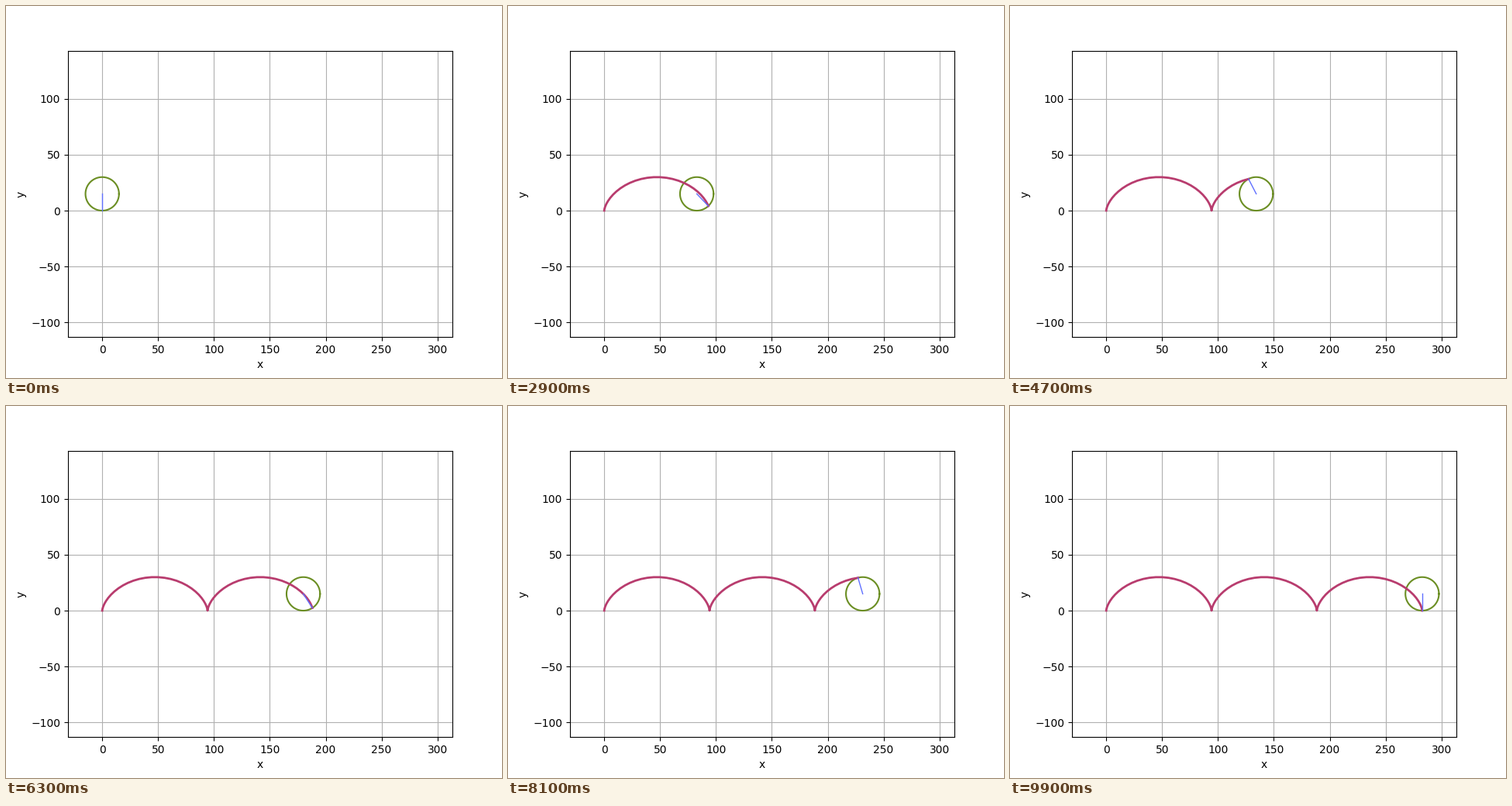
Write a matplotlib script that moves like this. It is 640 by 480 pixels and loops after 10000 ms.

```python
import numpy as np
import matplotlib.pyplot as plt
from matplotlib.animation import FuncAnimation

R = 15
FRAMES = 100
INTERVAL = 100

# Rolling angle over three full turns, and the cycloid of the rim point
theta = np.linspace(0, 6 * np.pi, FRAMES)
path_x = R * (theta - np.sin(theta))
path_y = R * (1 - np.cos(theta))

turn = np.linspace(0, 2 * np.pi, 100)
rim_x, rim_y = R * np.cos(turn), R + R * np.sin(turn)

fig, ax = plt.subplots(figsize=(6.4, 4.8), dpi=100)

# Equal scale on both axes, with a 5% margin around the whole run
left, right = -R, R * theta[-1] + R
margin = 0.05 * (right - left)
half_height = (right - left + 2 * margin) * 369.6 / 496 / 2
ax.set_xlim(left - margin, right + margin)
ax.set_ylim(R - half_height, R + half_height)
ax.set_xlabel("x")
ax.set_ylabel("y")
ax.grid(True)

circle, = ax.plot([], [], color="olivedrab", lw=1.5)
trace, = ax.plot([], [], color="#b83c6e", lw=2)
spoke, = ax.plot([], [], color="#6070ff", lw=1)


def update(i):
    center = R * theta[i]
    circle.set_data(center + rim_x, rim_y)
    trace.set_data(path_x[:i + 1], path_y[:i + 1])
    spoke.set_data([center, path_x[i]], [R, path_y[i]])
    return circle, trace, spoke


anim = FuncAnimation(fig, update, frames=FRAMES, init_func=lambda: update(0),
                     interval=INTERVAL, repeat=True, repeat_delay=0)
plt.show()
```
